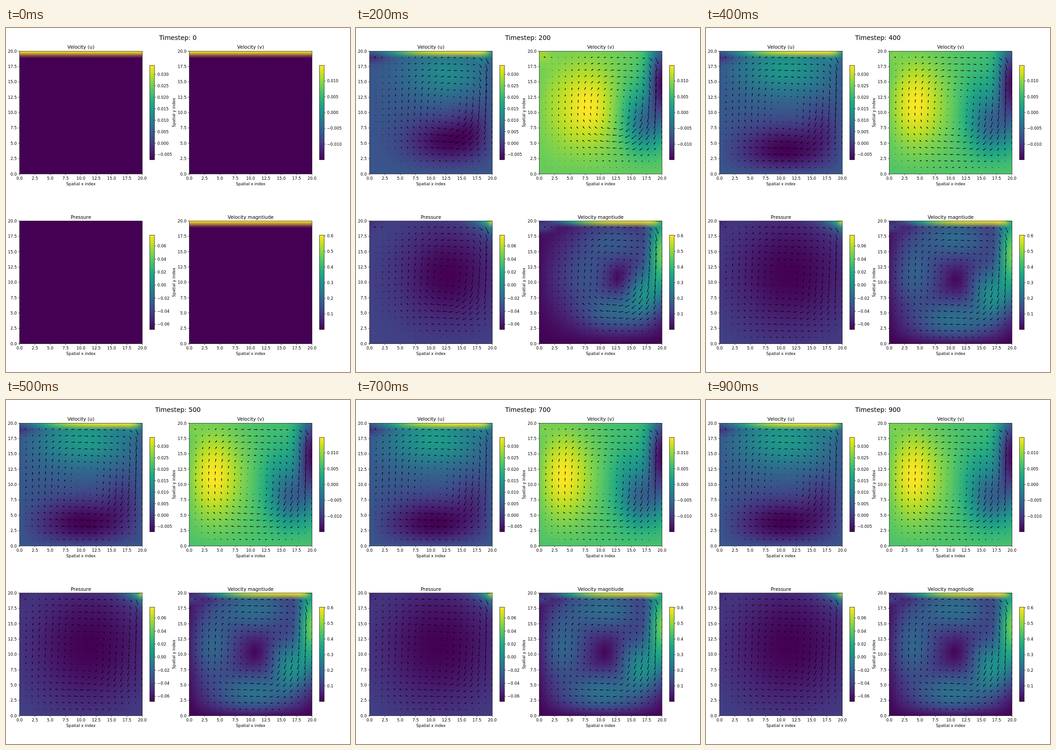
These frames come from a looping animation (748 by 748 pixels, 1000 ms). An HTML page with a canvas:

```html
<!DOCTYPE html>
<html>
<head>
<meta charset="utf-8">
<style>
html, body { margin: 0; width: 100%; height: 100%; overflow: hidden; background: #fff; }
canvas { display: block; }
</style>
</head>
<body>
<canvas id="stage" width="748" height="748"></canvas>
<script>
const ctx = document.getElementById('stage').getContext('2d');
const N = 20, SIZE = 266.8, CELL = SIZE / (N - 1), PT = 0.864;
const MAP = ['440154', '482475', '414487', '355f8d', '2a788e', '21918c',
  '22a884', '44bf70', '7ad151', 'bddf26', 'fde725']
  .map(h => [0, 2, 4].map(i => parseInt(h.substr(i, 2), 16)));

// first, step and tickY are the lowest tick, tick spacing and its pixel place
const panels = [
  { name: 'u', title: 'Velocity (u)', x: 29.5, y: 50.5, first: -0.005, step: 0.005, count: 8, digits: 3, tickY: 275.2, gap: 24.9 },
  { name: 'v', title: 'Velocity (v)', x: 398.5, y: 50.5, first: -0.01, step: 0.005, count: 5, digits: 3, tickY: 252.4, gap: 34.3 },
  { name: 'p', title: 'Pressure', x: 29.5, y: 419.7, first: -0.06, step: 0.02, count: 7, digits: 2, tickY: 644.2, gap: 28.35 },
  { name: 'm', title: 'Velocity magntiude', x: 398.5, y: 419.7, first: 0.1, step: 0.1, count: 6, digits: 1, tickY: 621.7, gap: 33.95 }
];

// Blobs are [height, x, y, width x, width y]; top and low shape u, the others v.
const keys = [
  { at: 1, top: [.14, 16, 17.5, 6, 4], low: [-.15, 15.4, 9.6, 5.5, 3.8], left: [.1, 9.5, 13, 9, 8], rise: [.05, 12.8, 13.5, 2.8, 4],
    turn: [-.1, 17.5, 8.5, 2.3, 3.8], right: [-.15, 17, 12, 2.5, 6], core: [16, 13.5, 5.8], misc: [62, .1] },
  { at: 2, top: [.17, 12.5, 16.5, 7, 4.2], low: [-.21, 12.6, 5.3, 6.5, 3.8], left: [.12, 7, 11, 7, 7.5], rise: [.04, 8.2, 11, 3, 5],
    turn: [-.17, 17.2, 8, 2.6, 4], right: [-.12, 15.5, 10, 3.2, 6], core: [12.8, 11.2, 7.5], misc: [50, .06] },
  { at: 3, top: [.19, 11, 17, 7.5, 4.4], low: [-.225, 11, 4.2, 7.5, 4], left: [.14, 4.8, 11.5, 5.8, 7.2], rise: [.03, 5, 11.5, 2.5, 5.5],
    turn: [-.18, 17, 7.8, 3, 4.2], right: [-.12, 15, 10.5, 3.5, 6], core: [11.6, 11.5, 9], misc: [45, .04] },
  { at: 5, top: [.22, 10.5, 17.5, 8, 4.5], low: [-.235, 10.5, 3.6, 8, 4.2], left: [.175, 3.8, 11.3, 5.2, 7.5], rise: [.03, 3.8, 12, 2.5, 5.5],
    turn: [-.19, 16.8, 7.5, 3.2, 4.2], right: [-.12, 15, 10.5, 3.5, 6], core: [11.4, 11.5, 10], misc: [42, .04] }
];
const JET = [-.48, 20, 15, 2.2, 7], SWEEP = [-.08, 17, 8, 3, 4];

function pose(step) {
  const s = Math.min(step, 5), i = keys.findIndex(k => k.at >= s);
  const b = keys[i], a = keys[Math.max(i - 1, 0)], out = {};
  const f = a === b ? 1 : Math.pow((s - a.at) / (b.at - a.at), 0.6);
  for (const k in b) if (k !== 'at') out[k] = b[k].map((n, j) => a[k][j] + (n - a[k][j]) * f);
  return out;
}

const blob = ([h, cx, cy, sx, sy], x, y) => h * Math.exp(-(((x - cx) / sx) ** 2) - ((y - cy) / sy) ** 2);
const fade = (d, amount, len) => 1 - amount * Math.exp(-d / len);

function sample(k, x, y, lid) {
  const sum = (...list) => list.reduce((t, b) => t + blob(b, x, y), 0);
  const floor = fade(y + 0.3, 1, 1.1);
  let u;
  if (lid) {
    u = 0.6 * (1 - Math.exp(-(((x + 1.5) / 7) ** 2))) * (1 - 0.7 * Math.exp(-(((20 - x) / 0.9) ** 2)));
  } else {
    u = sum(k.top, k.low, SWEEP) * fade(x, 0.8, 1.2) * fade(20 - x, 0.8, 1.2) * floor;
    u += sum([-.12, 0, 18.95, 3, 0.8], [.1, 18.5, 19, 1.5, 1]);
  }
  let v = sum(k.left, k.rise) * fade(x, 0.5, 1.2) + sum(JET, k.turn, k.right);
  v = v * floor + blob([k.misc[1], 0.3, 19.5, 1.5, 1.5], x, y);
  const [cx, cy, s] = k.core;
  const p = 0.2 * (1 - Math.exp(-((x - cx) ** 2 + (y - cy) ** 2) / (s * s)))
    + 0.82 * Math.exp(-(20 - x) / 1.8 - (20 - y) / 1.1) - 0.08 * Math.exp(-(x + 20 - y) / 1.2);
  return { u, v, p };
}

function fields(step) {
  const k = pose(Math.max(step, 1)), out = { u: [], v: [], p: [], m: [], scale: k.misc[0] };
  for (let r = 0; r < N; r++) for (let c = 0; c < N; c++) {
    const on = r ? 0 : 0.42;
    const s = step ? sample(k, c * 20 / 19, 20 - r * 20 / 19, !r) : { u: on, v: on, p: 0 };
    s.m = Math.hypot(s.u, s.v);
    for (const n in s) out[n].push(s[n]);
  }
  return out;
}

function color(f) {
  const s = Math.min(Math.max(f, 0), 1) * 10, i = Math.min(Math.floor(s), 9);
  return MAP[i].map((n, j) => n + (MAP[i + 1][j] - n) * (s - i));
}

const mesh = document.createElement('canvas');
mesh.width = mesh.height = N;
const meshCtx = mesh.getContext('2d');

function drawMesh(data, x, y) {
  const img = meshCtx.createImageData(N, N), lo = Math.min(...data), span = Math.max(...data) - lo || 1;
  data.forEach((d, i) => img.data.set([...color((d - lo) / span), 255], i * 4));
  meshCtx.putImageData(img, 0, 0);
  ctx.drawImage(mesh, x - CELL / 2, y - CELL / 2, CELL * N, CELL * N);
}

function arrow(x, y, dx, dy) {
  const w = 0.85, len = Math.hypot(dx, dy);
  if (len < w) {
    ctx.beginPath();
    ctx.arc(x, y, w / 2, 0, 7);
    ctx.fill();
    return;
  }
  const s = Math.min(1, len / (5 * w)), h = w * s;
  ctx.save();
  ctx.translate(x, y);
  ctx.rotate(Math.atan2(dy, dx));
  ctx.beginPath();
  for (const [a, b] of [[0, .5], [len - 4.5 * h, .5], [len - 5 * h, 1.5], [len, 0],
    [len - 5 * h, -1.5], [len - 4.5 * h, -.5], [0, -.5]]) ctx.lineTo(a, b * h);
  ctx.fill();
  ctx.restore();
}

function text(str, x, y, pt, align = 'center') {
  ctx.font = pt * PT + 'px "DejaVu Sans", sans-serif';
  ctx.textAlign = align;
  ctx.fillText(str, x, y);
}

function line(x1, y1, x2, y2) {
  ctx.beginPath();
  ctx.moveTo(x1, y1);
  ctx.lineTo(x2, y2);
  ctx.stroke();
}

function drawAxes(p) {
  const base = p.y + SIZE;
  ctx.strokeRect(p.x, p.y, SIZE, SIZE);
  for (let i = 0; i <= 8; i++) {
    const d = i * SIZE / 8, label = (i * 2.5).toFixed(1);
    line(p.x + d, base, p.x + d, base + 3);
    text(label, p.x + d, base + 12.4, 10);
    line(p.x, base - d, p.x - 3, base - d);
    text(label, p.x - 6, base - d + 3.2, 10, 'right');
  }
  text(p.title, p.x + SIZE / 2, p.y - 5.2, 12);
  text('Spatial x index', p.x + SIZE / 2, base + 24.8, 10);
  if (p.x > 100) {
    ctx.save();
    ctx.translate(p.x - 31, p.y + SIZE / 2);
    ctx.rotate(-Math.PI / 2);
    text('Spatial y index', 0, 0, 10);
    ctx.restore();
  }
}

function drawBar(p) {
  const x = p.x + 283.2, y = p.y + 30.7, w = 10.3, h = 205.3;
  const g = ctx.createLinearGradient(0, y + h, 0, y);
  MAP.forEach((c, i) => g.addColorStop(i / 10, `rgb(${c})`));
  ctx.fillStyle = g;
  ctx.fillRect(x, y, w, h);
  ctx.strokeRect(x, y, w, h);
  ctx.fillStyle = '#000';
  for (let i = 0; i < p.count; i++) {
    const ty = p.tickY - i * p.gap, val = p.first + i * p.step;
    const label = (val < -1e-9 ? '\u2212' : '') + Math.abs(val).toFixed(p.digits);
    line(x + w, ty, x + w + 3, ty);
    text(label, x + w + 6, ty + 3.2, 10, 'left');
  }
}

function draw(step) {
  const f = fields(step);
  ctx.fillStyle = '#fff';
  ctx.fillRect(0, 0, 748, 748);
  ctx.fillStyle = ctx.strokeStyle = '#000';
  ctx.lineWidth = 0.8 * PT;
  text('Timestep: ' + step * 100, 373.8, 26.3, 16);
  for (const p of panels) {
    ctx.save();
    ctx.beginPath();
    ctx.rect(p.x, p.y, SIZE, SIZE);
    ctx.clip();
    drawMesh(f[p.name], p.x, p.y);
    if (step) f.u.forEach((u, i) => {
      const r = Math.floor(i / N), c = i % N;
      if (r || c > 17) arrow(p.x + c * CELL, p.y + r * CELL, u * f.scale, -f.v[i] * (r ? f.scale : 0));
    });
    ctx.restore();
    drawAxes(p);
    drawBar(p);
  }
}

let shown = -1;
function tick(now) {
  const step = Math.floor(now / 100) % 10;
  if (step !== shown) draw(shown = step);
  requestAnimationFrame(tick);
}
tick(0);
</script>
</body>
</html>
```
